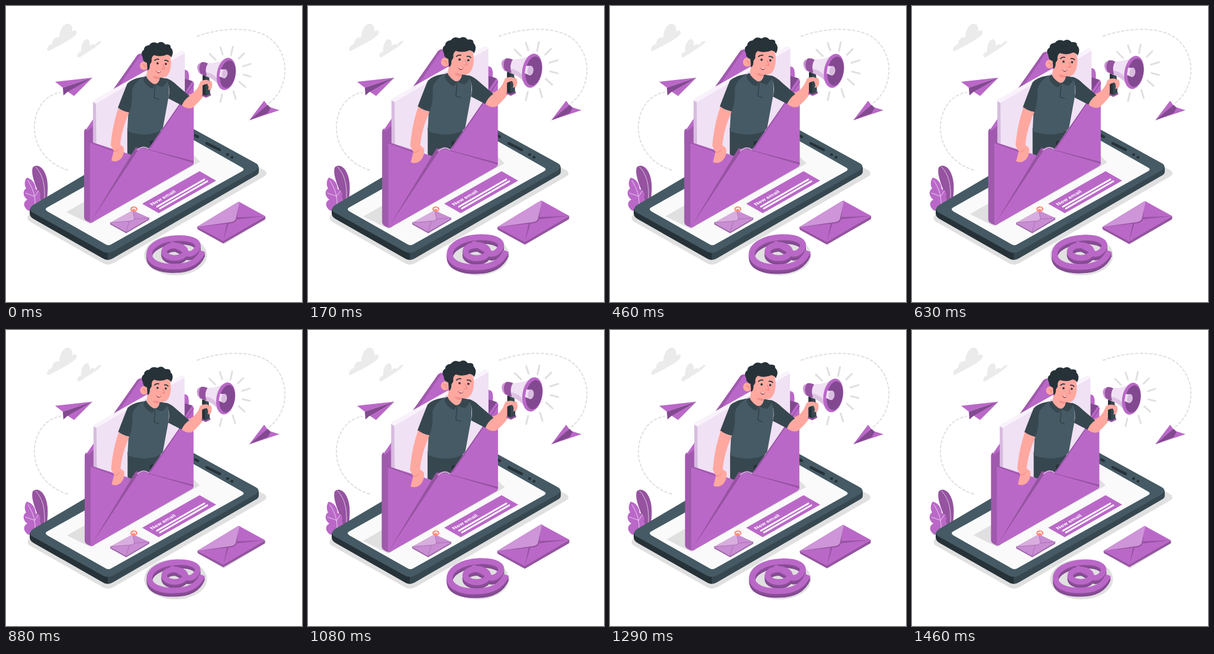
These frames come from a looping animation (500 px wide and 500 px high, 1.5 s). An HTML page:

```html
<!DOCTYPE html>
<html lang="en">
<head>
<meta charset="utf-8">
<title>New email</title>
<style>
  html, body { margin: 0; width: 100%; height: 100%; overflow: hidden; background: #fff; }
  svg { display: block; width: 100%; height: 100%; }
  .p { fill: #ba68c8; }
  .d { fill: #9553a0; }
  .side { fill: #a05aad; }
  .dd { fill: #824990; }
  .l { fill: #ce95d8; }
  .pale { fill: #f0e1f4; }
  .grey { fill: #e0e0e0; }
  .cloud { fill: #ebebeb; }
  .slate { fill: #455a64; }
  .deep { fill: #37474f; }
  .ink { fill: #263238; }
  .skin { fill: #ffa8a0; }
  .line { fill: none; stroke-linecap: round; stroke-linejoin: round; }
</style>
</head>
<body>
<svg viewBox="0 0 500 500">
  <!-- sky -->
  <g class="cloud">
    <path d="M70 76C68 71 72 66 78 64C78 57 83 52 90 53C90 44 94 35 100 31C107 27 113 33 112 43C117 39 121 42 119 47C115 54 90 67 72 76Z"/>
    <path d="M121 86C119 83 122 78 127 77C126 66 131 56 137 56C141 57 142 62 141 68C144 64 148 63 150 66C155 60 161 57 161 60C159 66 140 76 124 87Z"/>
  </g>
  <g class="line" stroke="#e0e0e0" stroke-width="2" stroke-dasharray="4 4">
    <path d="M323 51C360 38 405 34 437 49C462 62 473 90 471 112C470 137 457 155 442 166"/>
    <path d="M104 277C72 268 49 240 48 208C47 178 64 150 92 146"/>
  </g>
  <path class="p" d="M83 128L146 121L96 138ZM146 121L103 144L115 152Z"/>
  <path class="dd" d="M96 138L146 121L104 145L97 151Z"/>
  <path class="p" d="M411 193L436 160L442 168ZM411 193L446 171L462 176Z"/>
  <path class="dd" d="M411 193L442 167L447 172L442 181Z"/>

  <!-- leaves -->
  <path class="d" d="M60 334C54 308 41 288 45 273C48 268 57 268 63 277C71 289 72 306 69 328Z"/>
  <path class="p" d="M38 346C29 340 28 331 36 327C28 321 28 312 34 308C30 302 32 293 35 290C43 291 50 300 50 309C57 312 60 317 57 323L60 334Z"/>
  <g class="line" stroke="#fff" stroke-width=".9" opacity=".75">
    <path d="M50 272C62 284 66 302 65 325"/>
    <path d="M37 295C46 309 50 322 49 338M33 316L47 321M55 312L48 322"/>
  </g>

  <!-- phone -->
  <path class="grey" d="M42 350L300 212L436 277Q444 283 436 288L182 434Q172 440 163 434L40 364Q32 358 42 350Z"/>
  <path class="ink" d="M40 343L172 404L172 429Q167 429 163 426L47 360Q40 356 40 350Z"/>
  <path class="deep" d="M172 404L427 272V280Q427 284 421 287L181 426Q176 429 172 429Z"/>
  <path class="slate" d="M46 336L279 199Q288 193 299 198L421 265Q432 271 421 278L180 415Q172 419 164 415L47 350Q35 344 46 336Z"/>
  <path fill="#fafafa" d="M70 340L295 214L399 273Q404 276 399 279L177 403Q173 405 169 403L70 347Q64 343 70 340Z"/>
  <path class="line" stroke="#263238" stroke-width="4.5" d="M339 232L361 243M320 219L324 221M374 251h.6M381.500 255.500h.6"/>

  <!-- banner -->
  <path class="p" d="M230 334L327 279L355 295L258 350Z"/>
  <text transform="matrix(.866 -.5 .72 .5 247 337.600)" font-family="Inter, Open Sans, sans-serif" font-weight="700" font-size="9.300" fill="#fff">New email</text>
  <path class="line" stroke="#fff" stroke-width="2.800" d="M255 339L335 293M260 342L340 296"/>

  <!-- small letter -->
  <path class="d" opacity=".85" d="M176 366L203 381L242 358V361L203 384L176 369Z"/>
  <path fill="#c88dd2" d="M176 366L214 345L242 358L203 381Z"/>
  <path fill="#d8aede" d="M176 366L214 345L217 359Q216 363 211 363Z"/>
  <path class="line" stroke="#a868b4" stroke-width=".8" d="M176 366L211 363Q216 363 217 359L214 345M217 360L242 358M208 364L203 381"/>
  <ellipse cx="216" cy="343" rx="6" ry="4.500" fill="#ff8d79"/>
  <path class="line" stroke="#fff" stroke-width="1.600" d="M213 343L217 341L219 344"/>

  <!-- open envelope with speaker -->
  <g class="beat" data-center="254.7 213.6">
    <path class="grey" d="M102 348L300 235L328 263L142 368Z"/>
    <path class="p" d="M133 212L221 84Q225 79 231 81L306 109Q310 112 309 125L315 127Q318 129 317 133V262L134 330Z"/>
    <path class="side" d="M181 141L222 83L228 81L190 137ZM134 213L147 203V234L140 229Z"/>
    <path class="dd" d="M302 123L309 125L315 127L302 146Z"/>
    <path fill="#d7bbdf" d="M147 162L153 164V262L147 250Z"/>
    <path class="pale" d="M152 164L302 79V200L153 290Z"/>
    <path fill="#f9f2fb" d="M147 162Q147 159 150 158L297 75L302 78L152 165Z"/>

    <!-- body -->
    <path class="deep" d="M205 206L262 208L247 260L212 262L205 248Z"/>
    <path class="ink" d="M243 228L253 227L244 242Z"/>
    <path class="slate" d="M218 123L236 119L262 121L272 123Q277 139 274 157L265 206Q260 215 237 217Q216 217 205 211L207 172L211 140Z"/>
    <path class="deep" d="M231 120Q212 123 205 131Q198 148 189 172Q197 178 208 180Q214 166 213 142Q216 130 231 120Z"/>
    <path class="skin" d="M239 104L237 123Q243 136 259 130L260 117Z"/>
    <path fill="#f28f8b" d="M247 119Q254 126 260 122L260 118Z"/>
    <path class="deep" d="M236 118L232 123Q233 133 247 140L252 133Q242 129 236 118ZM260 121L272 123Q273 129 264 137L252 133Q259 129 260 121Z"/>
    <path class="line" stroke="#263238" stroke-width=".9" d="M252 135L250 155L258 158"/>

    <!-- head -->
    <path class="skin" d="M239 78L276 82Q281 94 277 109Q273 122 263 121Q248 120 239 106Z"/>
    <ellipse class="skin" cx="233" cy="101" rx="6.800" ry="7.200"/>
    <path class="ink" d="M239 109L238 96Q231 94 231 87Q226 78 233 74Q233 67 242 66Q247 59 256 63Q263 58 269 65Q279 64 278 70Q285 77 279 87Q277 83 272 82Q261 87 250 83Q245 86 246 94L243 99Q243 108 239 109Z"/>
    <g class="ink"><circle cx="256" cy="97" r="1.800"/><circle cx="270" cy="98" r="1.800"/></g>
    <path class="line" stroke="#263238" stroke-width="1.700" d="M251 92Q254 89 258 90M268 92Q272 91 274 94"/>
    <path class="line" stroke="#ee817b" stroke-width="1.100" d="M265 98L268 106L263 106M231 99Q235 99 235 104"/>
    <path fill="#a84650" d="M253 109Q257 112 262 110Q260 115 256 113Z"/>
    <path fill="#fff" d="M254 109.500Q257 111 261 110.500L260 112Q256 112 254 109.500Z"/>

    <!-- envelope front -->
    <path class="side" d="M132 213Q132 209 135 207L143 229V366Q132 363 132 357Z"/>
    <path class="p" d="M142 229L214 252L142 366ZM317 131V265L240 242Z"/>
    <path class="line" stroke="#9553a0" stroke-width="1.500" d="M317 132L244 239M142 230L196 250"/>
    <path class="d" d="M142 366L219 239L240 242L317 262V266Z"/>
    <path class="p" d="M142 366L222 245Q232 236 241 243L317 265Q317 268 313 270L150 363Q145 367 142 366Z"/>
    <path class="line" stroke="#d9a8e0" stroke-width="2" d="M222 243Q232 235 240 241"/>

    <!-- arms -->
    <path class="skin" d="M190 172C183 192 179 212 177 235L182 245L178 261Q186 265 194 258Q201 250 199 239L193 234C195 215 200 198 208 180Q197 178 190 172Z"/>
    <path class="line" stroke="#ee817b" stroke-width=".9" d="M182 245Q188 247 191 241"/>
    <path class="skin" d="M308 150L294 165Q305 176 315 172Q331 158 337 146L346 141Q350 134 347 127L335 124Q328 126 325 136Q317 149 308 150Z"/>
    <path class="deep" d="M270 122Q279 124 289 134L310 152Q301 158 297 168L274 156Q279 140 270 122Z"/>

    <!-- megaphone -->
    <path class="line" stroke="#e0e0e0" stroke-width="3" d="M344 81L354 91M362 70L366 82M383 69L380 83M402 80L393 89M413 98L400 102M413 119L401 116M404 137L394 128M388 157L384 144M362 162L365 149"/>
    <path class="deep" d="M332 117L343 117L345 151L337 154L332 150Z"/>
    <path class="ink" d="M332 117L337 118V154L332 150Z"/>
    <path class="d" d="M331 149L338 152L346 148V151L338 155L331 152Z"/>
    <path class="pale" d="M336 96Q354 99 373 88L365 142Q354 123 336 118Z"/>
    <path fill="#ddc2e3" d="M334 111Q354 113 360 129L365 141Q354 123 336 118Z"/>
    <path class="l" d="M323 104Q323 97 329 96L333 97L330 116Q324 113 323 104Z"/>
    <path class="d" d="M330 95Q335 94 341 97Q335 106 339 118Q332 118 328 113Q324 103 330 95Z"/>
    <g transform="rotate(10 373 115)">
      <ellipse class="p" cx="372" cy="115" rx="15.800" ry="27.500"/>
      <ellipse class="dd" cx="374.500" cy="115" rx="12.800" ry="23.500"/>
      <path class="pale" d="M361 109L369 108A5 7.500 0 0 1 369 123L361 121Z"/>
      <ellipse fill="#d9bce0" cx="369" cy="115" rx="4.500" ry="7.500"/>
    </g>
    <path class="skin" d="M328 128Q334 123 343 126L344 130L334 133Q329 136 327 141ZM339 130Q346 125 348 133Q348 141 341 142Q344 137 339 130Z"/>
  </g>

  <!-- closed envelope -->
  <path class="grey" d="M322 375L394 334L440 359L368 403Z"/>
  <g class="beat" data-center="380.500 366">
    <path class="d" d="M323 373L367 396L438 355V359Q438 361 435 362L367 401L325 378Q323 377 323 373Z"/>
    <path class="p" d="M323 373L392 331Q394 330 396 332L438 355L367 397Z"/>
    <path class="d" d="M390 357L438 355L386 361ZM376 367L367 397L373 368Z"/>
    <path class="d" d="M323 373L393 331L390 360Q388 366 381 367Z"/>
    <path class="l" d="M323 373L392 331Q394 330 394 333L388 360Q386 364 380 365Z"/>
  </g>

  <!-- at sign -->
  <ellipse class="grey" cx="286.500" cy="421" rx="53" ry="34"/>
  <g class="beat" data-center="286.500 419">
    <defs>
      <g id="at" class="line">
        <path stroke-width="9.500" style="stroke-linecap: butt" d="M302 411C303 422 315 420 321 412C331 400 316 391 289 392C262 393 242 405 242 419C242 434 262 441 286 440C308 440 325 432 332 414"/>
        <ellipse cx="285" cy="415" rx="18" ry="10.500" stroke-width="9.500"/>
        <path stroke-width="8" d="M281 402L303 414"/>
      </g>
    </defs>
    <use href="#at" stroke="#824990" y="6"/>
    <use href="#at" stroke="#8b4e97" y="3"/>
    <use href="#at" stroke="#ba68c8"/>
  </g>
</svg>
<script>
  const LOOP = 1500, FPS = 24, START = 860, DRAWN_SCALE = 1.0125;
  const parts = [...document.querySelectorAll('.beat')].map(node => ({
    node, center: node.dataset.center.split(' ').map(Number)
  }));

  // Double heartbeat: two quick swells, the second one fading slowly.
  function beat(u) {
    if (u < .2) return 1 + u / 2;
    if (u < .4) return 1.2 - u / 2;
    if (u < .6) return .8 + u / 2;
    return 1.25 - u / 4;
  }

  function draw(now) {
    // Steps begin on hundredths of a second, up to 5 ms early.
    const time = Math.floor((now % LOOP + 5) * FPS / 1000) * 1000 / FPS;
    const scale = beat((time - START + LOOP) % LOOP / LOOP) / DRAWN_SCALE;
    for (const { node, center: [x, y] } of parts) {
      node.setAttribute('transform',
        `translate(${x} ${y}) scale(${scale}) translate(${-x} ${-y})`);
    }
  }

  const begin = performance.now();
  function tick() {
    draw(performance.now() - begin);
    requestAnimationFrame(tick);
  }
  tick();
</script>
</body>
</html>
```
